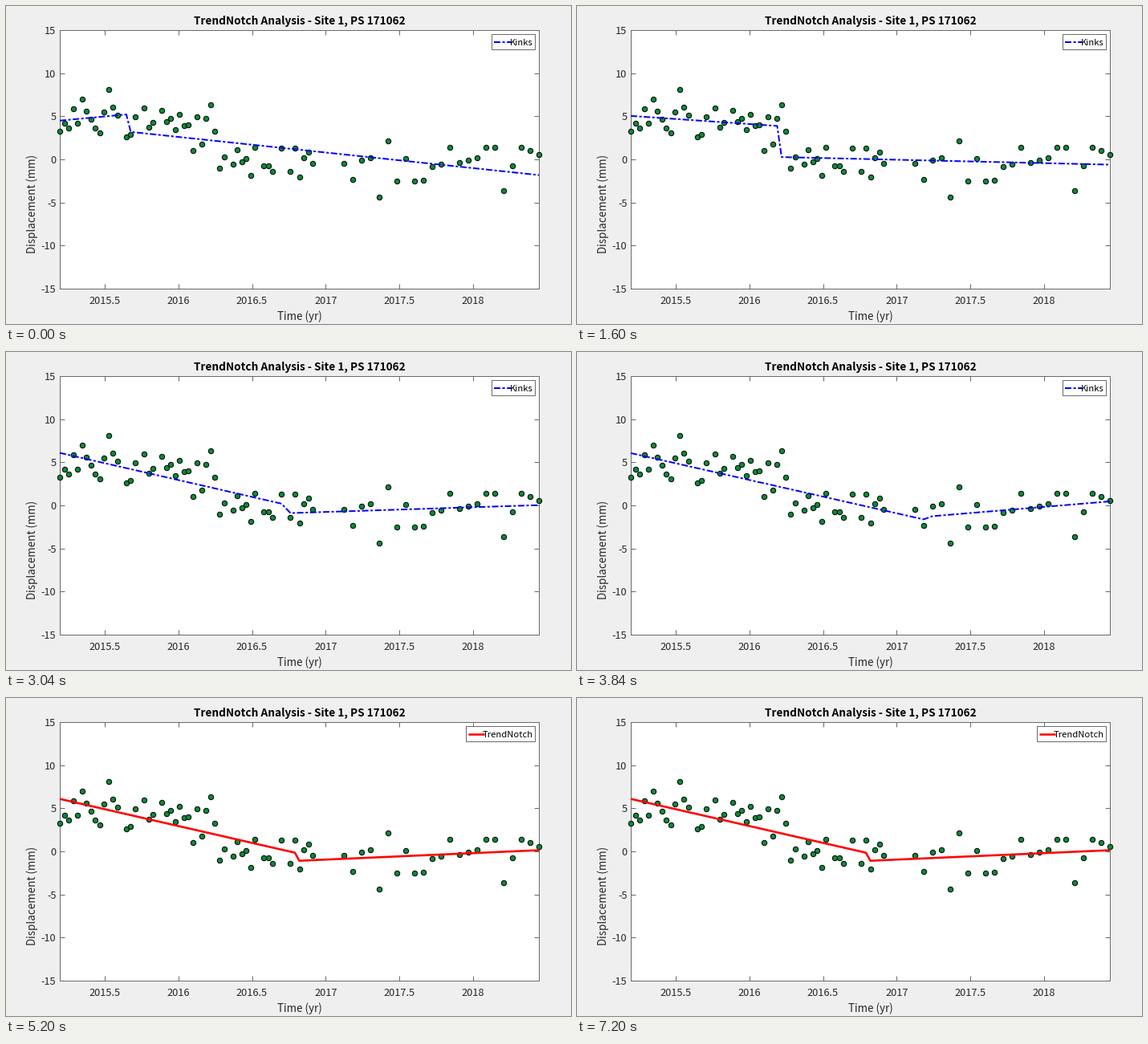
A matplotlib script for the animation above (7.36 s loop, 704x396 px).

```python
import numpy as np
import matplotlib.pyplot as plt
from matplotlib.animation import FuncAnimation
from matplotlib.patches import Rectangle

W, H, DPI = 704, 396, 100
LEFT, RIGHT, TOP, BOTTOM = 67, 664, 30, 352
TICK_MS, STEP_MS, LOOP_MS = 80, 200, 7360
FIRST_BREAK, BEST_BREAK, SCAN_STEPS = 15, 47, 25
INK, FRAME, BLUE, RED, GREEN = "#262626", "#6a6a6a", "#0000ff", "#ff0000", "#0a8a37"
NAME = "TrendNotch"

plt.rcParams["font.family"] = ["Noto Sans CJK JP", "Liberation Sans"]


def pt(px):
    return px * 72 / DPI


# One sample every 11 days at first, later every 22, with a few gaps.
gaps = {14, 18, 22, 38, 45, 49, 51}
slots = [k for k in range(58) if k not in gaps] + list(range(64, 109, 2))
years = 2015.195 + np.array(slots) * 11 / 365.25
mm = np.array([
    3.26, 4.19, 3.63, 5.86, 4.19, 7.02, 5.58, 4.65, 3.67, 3.07, 5.49, 8.09,
    6.05, 5.16, 2.60, 2.88, 4.93, 5.95, 3.77, 4.28, 5.67, 4.37, 4.74, 3.49,
    5.26, 3.91, 4.05, 1.07, 4.98, 1.81, 4.79, 6.37, 3.26, -1.02, .28, -.56,
    1.16, -.28, .09, -1.86, 1.44, -.70, -.79, -1.44, 1.35, -1.44, 1.26, -2.09,
    .19, .84, -.42, -.47, -2.33, -.09, .19, -4.37, 2.14, -2.56, .05, -2.47,
    -2.42, -.84, -.56, 1.40, -.37, -.09, .19, 1.40, 1.40, -3.63, -.74, 1.40,
    1.07, .60])


def broken_fit(count):
    """Separate straight-line fits before and after the break."""
    t = years - 2016.5
    parts = (slice(None, count), slice(count, None))
    return np.concatenate(
        [np.polyval(np.polyfit(t[p], mm[p], 1), t[p]) for p in parts])


fig = plt.figure(figsize=(W / DPI, H / DPI), dpi=DPI, facecolor="#efefef")

ax = fig.add_axes([LEFT / W, 1 - BOTTOM / H, (RIGHT - LEFT) / W, (BOTTOM - TOP) / H])
ax.set(xlim=(years[0], years[-1]), ylim=(-15, 15))
ax.set_xticks(np.arange(2015.5, 2018.1, 0.5))
ax.set_yticks(range(-15, 16, 5))
ax.tick_params(direction="in", length=pt(6), width=pt(1), color=FRAME,
               top=True, right=True, labelbottom=False, labelleft=False)
for spine in ax.spines.values():
    spine.set(color=FRAME, linewidth=pt(1))

ax.plot(years, mm, "o", ms=pt(6.4), mfc=GREEN, mec="black", mew=pt(1),
        clip_on=False, zorder=4)
fit, = ax.plot(years, mm, clip_on=False, zorder=5, dash_capstyle="butt",
               solid_capstyle="butt")

# Overlay measured in pixels for text and legend.
page = fig.add_axes([0, 0, 1, 1], zorder=2)
page.set(xlim=(0, W), ylim=(H, 0))
page.axis("off")


def label(x, y, text, size, ha="center", va="baseline", color=INK, **kw):
    return page.text(x, y, text, fontsize=pt(size), ha=ha, va=va, color=color, **kw)


mid_x = (LEFT + RIGHT) / 2
label(mid_x, 23, f"{NAME} Analysis - Site 1, PS 171062", 13.6,
      color="black", weight="bold")
label(mid_x, 390.5, "Time (yr)", 13.4)
label(33, (TOP + BOTTOM) / 2, "Displacement (mm)", 13.4,
      va="center_baseline", rotation=90)
for year in ax.get_xticks():
    x = LEFT + (year - years[0]) / (years[-1] - years[0]) * (RIGHT - LEFT)
    label(x, 371, f"{year:g}", 12.8)
for value in range(-15, 16, 5):
    y = TOP + (15 - value) / 30 * (BOTTOM - TOP)
    label(62.5, y + 5, f"{value}", 12.8, ha="right")

page.plot([0, W], [H - 0.5, H - 0.5], color="#a6a6a6", lw=pt(1))
box = page.add_patch(Rectangle((605, 35), 54, 19, fc="white", ec=FRAME, lw=pt(1)))
sample, = page.plot([], [], dash_capstyle="butt", solid_capstyle="butt")
caption = label(656.5, 49, "", 11.2, ha="right", color="black")


def draw(i):
    step = i * TICK_MS // STEP_MS
    scanning = step < SCAN_STEPS
    if scanning:
        count, text, x0, text_w = FIRST_BREAK + 2 * step, "Kinks", 605, 21
        style = dict(color=BLUE, lw=pt(2), ls=(0, (4, 1.3, 1.5, 1.3)))
    else:
        count, text, x0, text_w = BEST_BREAK, NAME, 573, 20
        style = dict(color=RED, lw=pt(2.6), ls="-")
    fit.set_ydata(broken_fit(count))
    fit.set(**style)
    sample.set_data([x0 + 2.5, x0 + 2.5 + text_w], [44.5, 44.5])
    sample.set(**style)
    box.set_x(x0)
    box.set_width(659 - x0)
    caption.set_text(text)
    return fit, sample, box, caption


anim = FuncAnimation(fig, draw, frames=LOOP_MS // TICK_MS, interval=TICK_MS,
                     repeat=True, repeat_delay=0, blit=False)
plt.show()
```
